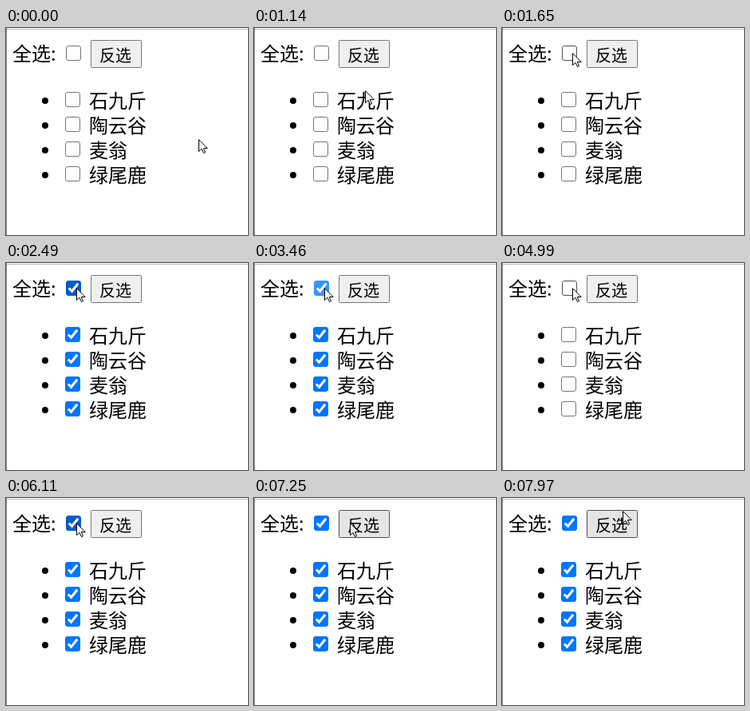
An HTML page with a canvas for the animation above (8 s loop, 303 by 259 pixels).

```html
<!DOCTYPE html>
<html lang="zh-CN">
<head>
<meta charset="utf-8">
<title>全选与反选</title>
<style>
html, body { margin: 0; width: 100%; height: 100%; overflow: hidden; background: #fff; }
canvas { display: block; width: 303px; height: 259px; }
</style>
</head>
<body>
<canvas id="stage"></canvas>
<script>
const W = 303, H = 259, LOOP = 8000;
const canvas = document.getElementById("stage");
const ctx = canvas.getContext("2d");
const ratio = window.devicePixelRatio || 1;
canvas.width = W * ratio;
canvas.height = H * ratio;
ctx.scale(ratio, ratio);

const names = ["石九斤", "陶云谷", "麦翁", "绿尾鹿"];
const FONT = '"Noto Sans CJK SC", "Noto Sans CJK", "Noto Sans", sans-serif';
const CHECK = 19;

const settle = u => Math.sin(u * Math.PI / 2);
const steady = u => u;

// Each glide follows its path in a fixed number of equal time steps
const rest = [241, 139];
const glides = [
  { start: 990, end: 1650, steps: 5, ease: settle, path: [[217, 131], [91, 46], [88, 31]] },
  { start: 7010, end: 7370, steps: 3, ease: settle, path: [[97, 31], [124, 31]] },
  { start: 7530, end: 7970, steps: 3, ease: steady, path: [[125, 31], [158, 31], [164, 25], [151, 16]] }
];
// Mouse button on the "select all" box
const presses = [
  { down: 2210, up: 2490 }, { down: 3460, up: 3600 }, { down: 3970, up: 4250 },
  { down: 4870, up: 4990 }, { down: 5990, up: 6110 }
];

const border = { idle: "#767676", hover: "#4f4f4f", pressed: "#8d8d8d" };
const accent = { idle: "#0075ff", hover: "#005cc8", pressed: "#3793ff" };

const inside = ([x, y], l, t, w, h) => x >= l && x < l + w && y >= t && y < t + h;

function along(path, u) {
  const place = u * (path.length - 1);
  const i = Math.min(Math.floor(place), path.length - 2);
  return path[i].map((v, axis) => Math.round(v + (path[i + 1][axis] - v) * (place - i)));
}

function pointerAt(t) {
  const glide = glides.findLast(g => g.start <= t);
  if (!glide) return rest;
  const { start, end, steps, ease, path } = glide;
  const step = Math.floor((t - start) / (end - start) * steps + 1e-6);
  return along(path, ease(Math.min(step / steps, 1)));
}

function text(str, x, baseline, size) {
  ctx.font = `${size}px ${FONT}`;
  ctx.fillStyle = "#000";
  ctx.fillText(str, x, baseline);
}

function box(x, y, w, h, radius, fill, line) {
  ctx.beginPath();
  ctx.roundRect(x + 0.5, y + 0.5, w - 1, h - 1, radius);
  ctx.fillStyle = fill;
  ctx.fill();
  ctx.strokeStyle = line;
  ctx.lineWidth = 1;
  ctx.stroke();
}

function polyline(points, x, y) {
  ctx.beginPath();
  points.forEach(([px, py]) => ctx.lineTo(x + px, y + py));
}

function checkbox(x, y, checked, state) {
  box(x, y, CHECK, CHECK, 2.5, checked ? accent[state] : "#fff", (checked ? accent : border)[state]);
  if (!checked) return;
  const unit = CHECK / 10;
  polyline([[2 * unit, 5 * unit], [4 * unit, 7 * unit], [8 * unit, 2 * unit]], x, y);
  ctx.strokeStyle = "#fff";
  ctx.lineWidth = CHECK * 0.16;
  ctx.stroke();
}

function arrow([x, y]) {
  polyline([[0.5, 0.7], [0.5, 15.5], [4, 12.3], [6.5, 17.5], [8.5, 16.6],
    [6.3, 11.5], [11.2, 11.5]], x, y);
  ctx.closePath();
  ctx.fillStyle = "#fff";
  ctx.fill();
  ctx.strokeStyle = "#000";
  ctx.lineWidth = 1;
  ctx.stroke();
}

function listItem(name, y, checked) {
  ctx.beginPath();
  ctx.arc(49, y + 11, 4, 0, Math.PI * 2);
  ctx.fillStyle = "#000";
  ctx.fill();
  checkbox(74, y, checked, "idle");
  text(name, 104, y + 20, 24);
}

function draw(t) {
  const pointer = pointerAt(t);
  const checked = presses.filter(p => p.up <= t).length % 2 === 1;
  const pressed = presses.some(p => t >= p.down && t < p.up);
  const overAll = inside(pointer, 75, 22, CHECK, CHECK);
  const overButton = inside(pointer, 106, 15, 64, 35);

  ctx.fillStyle = "#fff";
  ctx.fillRect(0, 0, W, H);
  ctx.fillStyle = "#bbb";
  ctx.fillRect(0, 1, W, 1);
  ctx.fillStyle = "#777";
  ctx.fillRect(0, 0, 1, H);

  text("全选:", 8, 41, 24);
  checkbox(75, 22, checked, pressed ? "pressed" : overAll ? "hover" : "idle");
  box(106, 15, 64, 35, 1, overButton ? "#e5e5e5" : "#efefef",
    overButton ? border.hover : border.idle);
  text("反选", 117, 42, 20);
  names.forEach((name, i) => listItem(name, 80 + i * 31, checked));
  arrow(pointer);
}

const start = performance.now();
function tick() {
  draw((performance.now() - start) % LOOP);
  requestAnimationFrame(tick);
}
tick();
</script>
</body>
</html>
```
